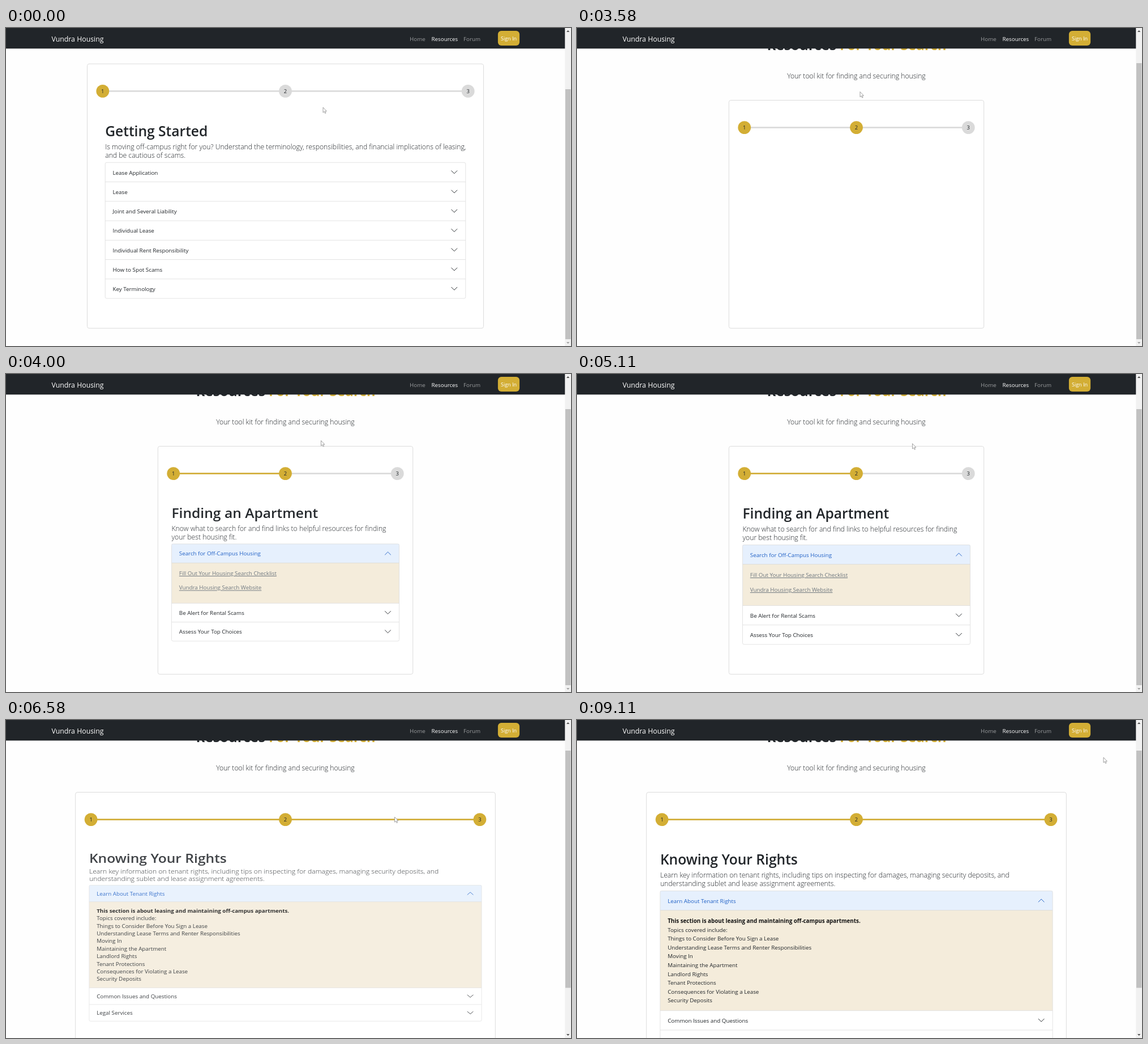
Animation, 998 px wide and 561 px high, one loop 9160 ms. Source, as an HTML page:

```html
<!DOCTYPE html>
<html lang="en">
<head>
<meta charset="utf-8">
<title>Housing resources</title>
<style>
  html, body { margin: 0; width: 100%; height: 100%; overflow: hidden; background: #fefefe; }
  svg { display: block; width: 998px; height: 561px; font-family: "Open Sans", "Noto Sans", sans-serif; }
  text { fill: #212529; font-size: 9.8px; white-space: pre; }
  .title { font-size: 24.6px; font-weight: 600; }
  .lead { font-size: 12.2px; font-weight: 300; }
  .hero { font-size: 24.2px; font-weight: 700; }
  .gold { fill: #d3ae35; }
  .num { font-size: 9.4px; text-anchor: middle; }
  .bold { font-weight: 700; fill: #111; }
  .link { fill: #6c757d; text-decoration: underline; }
  .open { fill: #1f60c6; }
  .brand { font-size: 12.3px; fill: #fff; }
  .nav { fill: #9a9c9e; }
  .active { fill: #fff; }
  .sign { fill: #fff; font-size: 9px; text-anchor: middle; }
</style>
</head>
<body>
<svg id="stage" viewBox="0 0 998 561"></svg>
<script>
const LOOP = 9160;
const GOLD = '#d3ae35', GRAY = '#dadada', EDGE = '#dcdcdc', INK = '#212529';
const MID = 493.5, ROW = 34.25, LINE = 15.58;
const stage = document.getElementById('stage');

function add(parent, tag, attrs = {}, content) {
  const node = document.createElementNS('http://www.w3.org/2000/svg', tag);
  for (const key in attrs) node.setAttribute(key, attrs[key]);
  if (content) node.textContent = content;
  return parent.appendChild(node);
}
const label = (parent, x, y, content, cls = '') => add(parent, 'text', { x, y, class: cls }, content);
const box = (parent, x, y, width, height, attrs) => add(parent, 'rect', { x, y, width, height, ...attrs });

const pages = [
  {
    top: 63.3, half: 350, bottom: 529.7, pad: 31.7, reach: 322.7, thumb: [108, 549], atEnd: true,
    title: 'Getting Started',
    lead: ['Is moving off-campus right for you? Understand the terminology, responsibilities, and financial implications of leasing,',
      'and be cautious of scams.'],
    items: ['Lease Application', 'Lease', 'Joint and Several Liability', 'Individual Lease',
      'Individual Rent Responsibility', 'How to Spot Scams', 'Key Terminology']
  },
  {
    top: 127.5, half: 225.2, bottom: 529.7, pad: 24.2, reach: 197.8, thumb: [62, 549], atEnd: true,
    title: 'Finding an Apartment',
    lead: ['Know what to search for and find links to helpful resources for finding', 'your best housing fit.'],
    items: ['Search for Off-Campus Housing', 'Be Alert for Rental Scams', 'Assess Your Top Choices'],
    links: ['Fill Out Your Housing Search Checklist', 'Vundra Housing Search Website']
  },
  {
    top: 127.5, half: 370.8, bottom: 600, pad: 24.2, reach: 343.4, thumb: [54, 472.5], atEnd: false,
    title: 'Knowing Your Rights',
    lead: ['Learn key information on tenant rights, including tips on inspecting for damages, managing security deposits, and',
      'understanding sublet and lease assignment agreements.'],
    items: ['Learn About Tenant Rights', 'Common Issues and Questions', 'Legal Services'],
    notes: ['This section is about leasing and maintaining off-campus apartments.', 'Topics covered include:',
      'Things to Consider Before You Sign a Lease', 'Understanding Lease Terms and Renter Responsibilities',
      'Moving In', 'Maintaining the Apartment', 'Landlord Rights', 'Tenant Protections',
      'Consequences for Violating a Lease', 'Security Deposits']
  }
];

function chevron(parent, x, y, up) {
  const d = up ? 2.5 : -2.5;
  add(parent, 'path', {
    d: `M${x - 5} ${y + d}l5 ${-2 * d}l5 ${2 * d}`, fill: 'none', stroke: up ? '#1f60c6' : INK,
    'stroke-width': 0.95, 'stroke-linecap': 'round', 'stroke-linejoin': 'round'
  });
}

function buildAccordion(parent, page, x, y, width) {
  const lines = page.links || page.notes;
  const bodyHeight = page.links ? 72.8 : page.notes ? 177 : 0;
  const total = page.items.length * ROW + bodyHeight;
  box(parent, x, y, width, total, { rx: 2.6, fill: '#fff' });
  if (lines) {
    box(parent, x, y, width, ROW, { fill: '#e6f0fd' });
    box(parent, x, y + ROW, width, bodyHeight, { fill: '#f4ecdb' });
  }
  let rowTop = y;
  page.items.forEach((item, i) => {
    const opened = i === 0 && !!lines;
    if (i) box(parent, x, rowTop - 0.4, width, 0.8, { fill: EDGE });
    label(parent, x + 13.3, rowTop + 21.2, item, opened ? 'open' : '');
    chevron(parent, x + width - 20, rowTop + 17, opened);
    rowTop += ROW;
    if (!opened) return;
    box(parent, x, rowTop - 0.4, width, 0.8, { fill: '#d8d8d4' });
    lines.forEach((line, n) => {
      const step = page.links ? 26 : LINE;
      label(parent, x + 13.3, rowTop + 22.4 + n * step, line,
        page.links ? 'link' : n === 0 ? 'bold' : '');
    });
    rowTop += bodyHeight;
  });
  box(parent, x, y, width, total, { rx: 2.6, fill: 'none', stroke: EDGE, 'stroke-width': 0.8 });
}

function buildPage(page, index) {
  const root = add(stage, 'g');
  const { top, half, reach } = page;
  if (index) {
    label(root, 335.5, 39, 'Resources', 'hero');
    label(root, 464, 39, 'For Your Search', 'hero gold');
    label(root, MID, 88.6, 'Your tool kit for finding and securing housing', 'lead').setAttribute('text-anchor', 'middle');
  }
  box(root, MID - half, top, half * 2, page.bottom - top, { rx: 3.5, fill: '#fff', stroke: '#d9d9d9', 'stroke-width': 0.9 });

  const cy = top + 48.1;
  box(root, MID - reach, cy - 1.3, reach * 2, 2.6, { fill: GRAY });
  page.bar = box(root, MID - reach, cy - 1.3, 0, 2.6, { fill: GOLD });
  for (let i = 0; i < 3; i++) {
    const cx = MID + (i - 1) * reach;
    add(root, 'circle', { cx, cy, r: 11.4, fill: i <= index ? GOLD : GRAY });
    label(root, cx, cy + 3.8, String(i + 1), 'num');
  }

  const x = MID - half + page.pad;
  page.content = add(root, 'g');
  page.pivot = top + 103.5;
  label(page.content, x, top + 127.5, page.title, 'title');
  page.lead.forEach((line, n) => label(page.content, x, top + 150.2 + n * LINE, line, 'lead'));
  buildAccordion(page.content, page, x, top + 174, (MID - x) * 2);

  const [from, to] = page.thumb;
  box(root, 987.3, 0, 10.7, 561, { fill: '#f1f1f1' });
  box(root, 988, from, 9.5, to - from, { fill: '#c1c1c1' });
  add(root, 'path', { d: 'M990 7l2.7-3l2.7 3z', fill: '#505050' });
  add(root, 'path', { d: 'M990 554l2.7 3l2.7-3z', fill: page.atEnd ? '#a0a0a0' : '#505050' });
  page.root = root;
}

function buildNavbar() {
  box(stage, 0, 0, 987.3, 36.3, { fill: INK });
  label(stage, 80.5, 23.7, 'Vundra Housing', 'brand');
  label(stage, 713, 22.6, 'Home', 'nav');
  label(stage, 751.5, 22.6, 'Resources', 'active');
  label(stage, 808, 22.6, 'Forum', 'nav');
  box(stage, 868.9, 5, 38.2, 26.1, { rx: 6, fill: GOLD });
  label(stage, 888, 22, 'Sign In', 'sign');
}

pages.forEach(buildPage);
buildNavbar();
const pointer = add(stage, 'path', {
  d: 'M0 0v9.2l2.1-1.9l1.5 3.3l1.5-.7l-1.5-3.1h2.8z',
  fill: '#fff', stroke: '#8a8a8a', 'stroke-width': 0.8, 'stroke-linejoin': 'round'
});

// Cubic Bezier easing with end points (0,0) and (1,1).
function bezier(x1, y1, x2, y2) {
  const curve = (a, b, s) => 3 * a * s * (1 - s) ** 2 + 3 * b * s * s * (1 - s) + s ** 3;
  return p => {
    let low = 0, high = 1;
    for (let i = 0; i < 24; i++) {
      const s = (low + high) / 2;
      if (curve(x1, x2, s) < p) low = s; else high = s;
    }
    return curve(y1, y2, low);
  };
}
const ease = bezier(0.25, 0.1, 0.25, 1);
const easeInOut = bezier(0.42, 0, 0.58, 1);
const progress = (t, start, length) => Math.min(1, Math.max(0, (t - start) / length));

const SWITCHES = [0, 3570, 6270, Infinity];
const EXIT = 300, DELAY = 30, ENTER = 500, FILL = 250;

// Pointer tip: [time, x, y]
const path = [
  [0, 560, 140], [2840, 560, 140], [3110, 500, 112.5], [3640, 500, 112.5], [3980, 556.5, 117.5],
  [4950, 556.5, 117.5], [5210, 608, 125], [5470, 608, 125], [5580, 679, 160],
  [5980, 679, 160], [6050, 686.5, 171], [8630, 686.5, 171], [8840, 782, 138], [9000, 918, 85],
  [9100, 930, 66], [LOOP, 930, 66]
];

function pointerAt(t) {
  const i = Math.max(1, path.findIndex(point => point[0] > t));
  const [t0, x0, y0] = path[i - 1], [t1, x1, y1] = path[i];
  const p = easeInOut(progress(t, t0, t1 - t0));
  return [x0 + (x1 - x0) * p, y0 + (y1 - y0) * p];
}

function render(t) {
  const current = t < SWITCHES[1] ? 0 : t < SWITCHES[2] ? 1 : 2;
  pages.forEach((page, i) => page.root.setAttribute('display', i === current ? 'inline' : 'none'));

  const page = pages[current], start = SWITCHES[current] + DELAY, end = SWITCHES[current + 1];
  const entered = current ? ease(progress(t, start, ENTER)) : 1;
  const left = end < LOOP ? ease(progress(t, end - EXIT, EXIT)) : 0;
  const shown = entered * (1 - left);
  page.content.setAttribute('opacity', shown);
  page.content.setAttribute('transform', `translate(0 ${page.pivot * (1 - shown)}) scale(1 ${shown})`);

  if (current) {
    const filled = current - 1 + ease(progress(t, start + 20, FILL));
    page.bar.setAttribute('width', page.reach * filled);
  }
  pointer.setAttribute('transform', `translate(${pointerAt(t)})`);
}

const begin = performance.now();
function frame() {
  render((performance.now() - begin) % LOOP);
  requestAnimationFrame(frame);
}
render(0);
requestAnimationFrame(frame);
</script>
</body>
</html>
```
